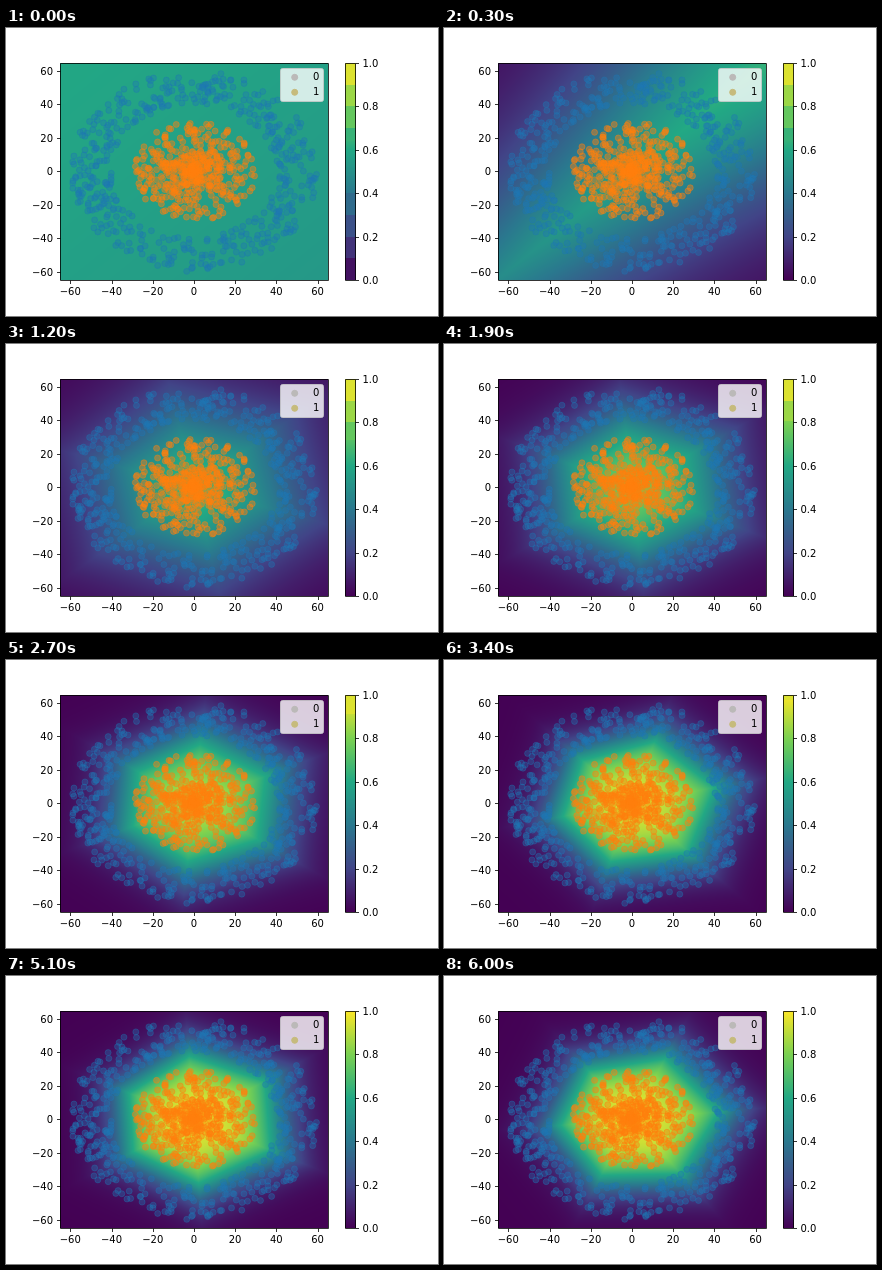
An HTML page with a canvas for the animation above (6.1 s loop, 432 px wide and 288 px high).

```html
<!DOCTYPE html>
<html lang="en">
<head>
<meta charset="utf-8">
<title>Decision surface</title>
<style>
html, body { margin: 0; width: 100%; height: 100%; overflow: hidden; background: #fff; }
canvas, svg { position: absolute; display: block; }
svg { left: 0; top: 0; }
#field { left: 54px; top: 35px; }
#bar { left: 339px; top: 35px; }
text { font: 10px "DejaVu Sans", sans-serif; fill: #000; }
</style>
</head>
<body>
<canvas id="field" width="268" height="217"></canvas>
<canvas id="bar" width="11" height="217"></canvas>
<svg id="plot" width="432" height="288" viewBox="0 0 432 288"></svg>
<script>
const LOOP = 6100, STEP = 100;
const W = 268, H = 217, SX = 2.0603, SY = 1.6726, CX = 187.92, CY = 143.28;
const svg = document.getElementById('plot');

function add(tag, attrs, text) {
  const el = document.createElementNS('http://www.w3.org/2000/svg', tag);
  for (const k in attrs) el.setAttribute(k, attrs[k]);
  if (text) el.textContent = text;
  return svg.appendChild(el);
}

const mix = (a, b, u) => a + (b - a) * u;
const ramp = (t, a, b) => Math.min(1, Math.max(0, (t - a) / (b - a)));
const smooth = u => u * u * (3 - 2 * u);

// Colour map
const stops = ['440154', '414487', '2a788e', '22a884', '7ad151', 'fde725']
  .map(h => [0, 2, 4].map(i => parseInt(h.slice(i, i + 2), 16)));
function viridis(v) {
  const p = v * 5, i = Math.min(4, Math.floor(p));
  return stops[i].map((c, k) => mix(c, stops[i + 1][k], p - i));
}
const lut = Array.from({ length: 1025 }, (_, i) => viridis(i / 1024));

// Surface at t seconds: a tilted plane turns into a ridge, then a turning hexagon
function surface(t) {
  const start = ramp(t, 0, 0.3), spread = ramp(t, 0.3, 1.2);
  const learned = smooth(ramp(t, 0, 4));
  const ridge = start - spread, flat = 1 - start;
  const bias = mix(1.3, 4.9, learned), slope = bias / 73;
  const turn = 45 - 2.75 * t * t;
  const creases = [0, 60, 120].map((offset, i) => {
    const a = (turn + offset) * Math.PI / 180;
    const w = i ? slope * spread : slope * start + 0.022 * ridge;
    return [Math.sin(a) * w, Math.cos(a) * w];
  });
  return {
    start, learned, bias, creases,
    peak: mix(0.72, 0.97, learned),
    gx: 0.005 * ridge - 0.002 * flat + 0.011 * learned,
    gy: 0.005 * ridge + 0.002 * flat
  };
}

const fieldCtx = document.getElementById('field').getContext('2d');
const fieldImg = fieldCtx.createImageData(W, H);
function drawField({ peak, bias, gx, gy, creases }) {
  const [[a, b], [c, d], [e, f]] = creases, px = fieldImg.data;
  for (let j = 0, o = 0; j < H; j++) {
    const y = (CY - 35.5 - j) / SY;
    for (let i = 0; i < W; i++, o += 4) {
      const x = (i + 54.5 - CX) / SX;
      const z = bias + gx * x + gy * y
        - Math.abs(a * x - b * y) - Math.abs(c * x - d * y) - Math.abs(e * x - f * y);
      const col = lut[Math.round(1024 * peak / (1 + Math.exp(-z)))];
      px[o] = col[0]; px[o + 1] = col[1]; px[o + 2] = col[2]; px[o + 3] = 255;
    }
  }
  fieldCtx.putImageData(fieldImg, 0, 0);
}

// The colour bar is banded outside the range the surface uses
const barCtx = document.getElementById('bar').getContext('2d');
function drawBar({ start, learned }) {
  const low = 0.4 * (1 - start), high = mix(0.64, 1, learned);
  for (let j = 0; j < H; j++) {
    let v = 1 - (j + 0.5) / H;
    if (v < low || v > high) v = (Math.floor(v * 10) + 0.5) / 10;
    barCtx.fillStyle = `rgb(${viridis(v).map(Math.round)})`;
    barCtx.fillRect(0, j, 11, 1);
  }
}

// Scatter
let seed = 20;
function rnd() {
  seed = (seed + 0x6D2B79F5) | 0;
  let n = Math.imul(seed ^ (seed >>> 15), 1 | seed);
  n = (n + Math.imul(n ^ (n >>> 7), 61 | n)) ^ n;
  return ((n ^ (n >>> 14)) >>> 0) / 4294967296;
}
function cloud(r0, r1, color, alpha) {
  for (let i = 0; i < 500; i++) {
    const r = mix(r0, r1, rnd()), a = rnd() * 2 * Math.PI;
    add('circle', {
      cx: (CX + r * Math.cos(a) * SX).toFixed(2), cy: (CY - r * Math.sin(a) * SY).toFixed(2),
      r: 3, fill: color, stroke: color, 'fill-opacity': alpha, 'stroke-opacity': alpha
    });
  }
}
cloud(40, 60, '#1f77b4', 0.36);
cloud(0, 30, '#ff7f0e', 0.44);

// Axes
const snap = v => Math.round(v) + 0.5;
const line = d => add('path', { d, stroke: '#000', 'stroke-width': 0.8, fill: 'none' });
const label = (x, y, s, anchor) => add('text', { x, y: Math.round(y), 'text-anchor': anchor }, s);
line('M54.5 35.5H322.5V252.5H54.5Z');
line('M339.5 35.5H349.5V252.5H339.5Z');
for (let v = -60; v <= 60; v += 20) {
  const s = String(v).replace('-', '\u2212'), x = CX + v * SX, y = CY - v * SY;
  line(`M${snap(x)} 252.5v3.5`);
  label(x, 267, s, 'middle');
  line(`M54.5 ${snap(y)}h-3.5`);
  label(47, y + 4, s, 'end');
}
for (let i = 0; i <= 5; i++) {
  const y = 252 - i * 217.44 / 5;
  line(`M349.5 ${snap(y)}h3.5`);
  label(356.5, y + 4, (i / 5).toFixed(1), 'start');
}

// Legend
add('rect', {
  x: 274.5, y: 40.5, width: 43, height: 33, rx: 2,
  fill: '#fff', 'fill-opacity': 0.8, stroke: '#ccc', 'stroke-opacity': 0.8
});
['#bbb9b8', '#c6bb7c'].forEach((color, i) => {
  const y = 49 + 15 * i;
  label(307, y + 3, String(i), 'start');
  add('circle', { cx: 288.7, cy: y + 0.3, r: 3, fill: color, stroke: color });
});

const begin = performance.now();
let shown = -1;
function tick() {
  const step = Math.floor((performance.now() - begin) % LOOP / STEP);
  if (step !== shown) {
    shown = step;
    const state = surface(step * STEP / 1000);
    drawField(state);
    drawBar(state);
  }
  requestAnimationFrame(tick);
}
tick();
</script>
</body>
</html>
```
